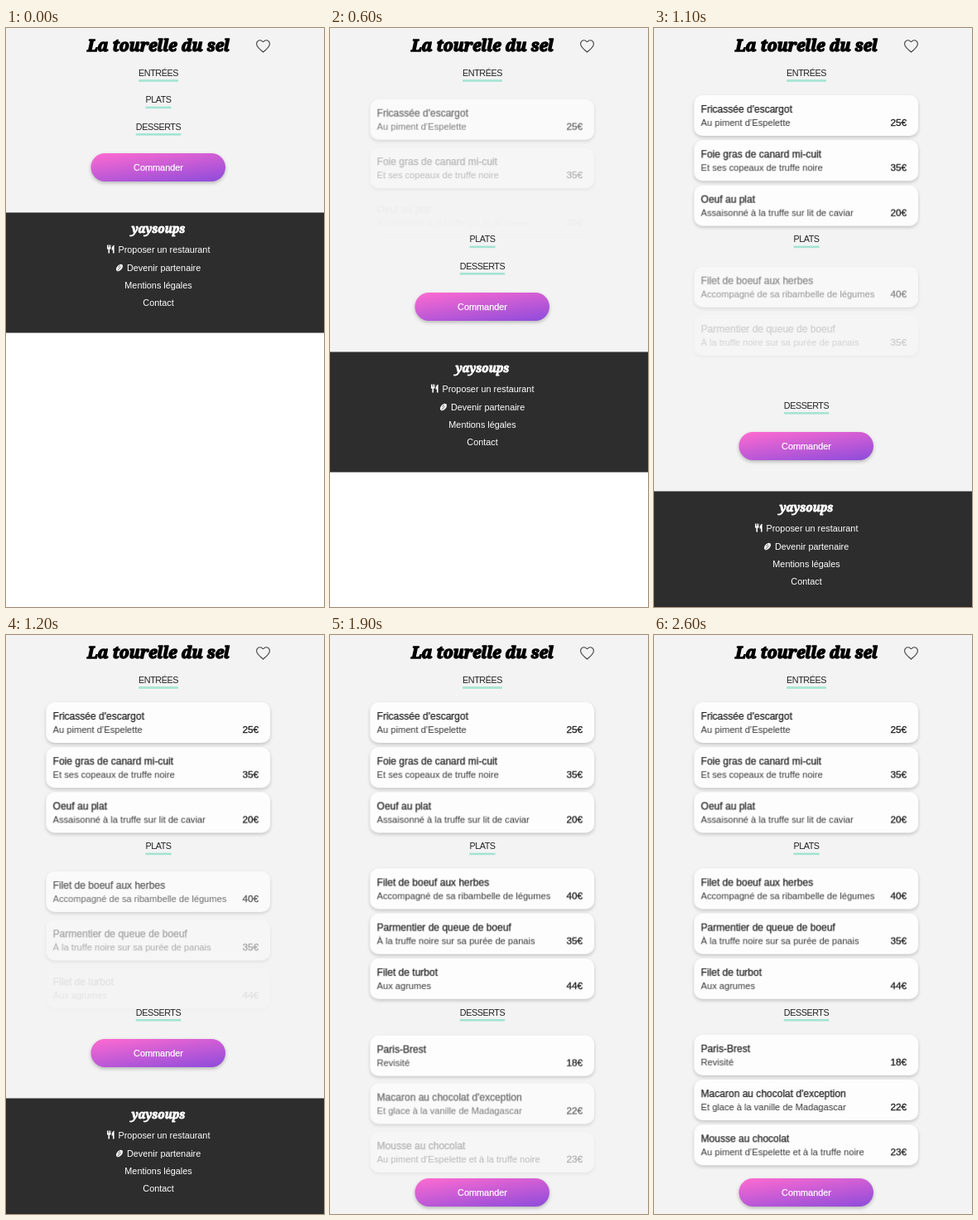
An HTML page with a canvas for the animation above (3.9 s loop, 384 by 698 pixels).

```html
<!DOCTYPE html>
<html lang="fr">
<head>
<meta charset="utf-8">
<title>Menu</title>
<style>
html, body { margin: 0; width: 100%; height: 100%; overflow: hidden; background: #fff; }
canvas { display: block; width: 384px; height: 698px; }
</style>
</head>
<body>
<canvas id="stage"></canvas>
<script>
const W = 384, H = 698, MID = 184;
const LOOP = 3900, STEP = 100;
const ROW = 32.4, OPEN = 168, PITCH = 54.2;
const DELAY = 175, STAGGER = 150, FADE = 540, RISE = 12.5;
const FOOT = 222.5;
const CARD = { x: 48.4, y: 81, w: 270.6, h: 49, pad: 10 };
const SANS = '"Liberation Sans", Arial, sans-serif';
const SLAB = '"Noto Serif", serif';

const sections = [
  { name: 'ENTRÉES', at: 100, dishes: [
    ["Fricassée d'escargot", 'Au piment d’Espelette', '25€'],
    ['Foie gras de canard mi-cuit', 'Et ses copeaux de truffe noire', '35€'],
    ['Oeuf au plat', 'Assaisonné à la truffe sur lit de caviar', '20€'] ] },
  { name: 'PLATS', at: 655, dishes: [
    ['Filet de boeuf aux herbes', 'Accompagné de sa ribambelle de légumes', '40€'],
    ['Parmentier de queue de boeuf', 'À la truffe noire sur sa purée de panais', '35€'],
    ['Filet de turbot', 'Aux agrumes', '44€'] ] },
  { name: 'DESSERTS', at: 1240, dishes: [
    ['Paris-Brest', 'Revisité', '18€'],
    ["Macaron au chocolat d'exception", 'Et glace à la vanille de Madagascar', '22€'],
    ['Mousse au chocolat', 'Au piment d’Espelette et à la truffe noire', '23€'] ] }
];

const dpr = window.devicePixelRatio || 1;

function surface(canvas, w, h) {
  canvas.width = Math.round(w * dpr);
  canvas.height = Math.round(h * dpr);
  const c = canvas.getContext('2d');
  c.scale(canvas.width / w, canvas.height / h);
  return c;
}

const ctx = surface(document.getElementById('stage'), W, H);

function text(c, str, x, y, size, color, opt = {}) {
  c.font = `${opt.style || ''} ${size}px ${opt.family || SANS}`;
  c.textAlign = opt.align || 'left';
  c.letterSpacing = (opt.spacing || 0) + 'px';
  c.fillStyle = c.strokeStyle = color;
  c.fillText(str, x, y);
  if (opt.weight) {
    c.lineWidth = opt.weight;
    c.lineJoin = 'round';
    c.strokeText(str, x, y);
  }
}

function panel(c, x, y, w, h, r, fill, shade) {
  c.save();
  c.shadowColor = `rgba(0,0,0,${shade})`;
  c.shadowBlur = 4 * dpr;
  c.shadowOffsetY = 2 * dpr;
  c.fillStyle = fill;
  c.beginPath();
  c.roundRect(x, y, w, h, r);
  c.fill();
  c.restore();
}

// Each card is drawn once so that it can fade as a whole.
function makeCard([title, note, price]) {
  const img = document.createElement('canvas');
  const { w, h, pad } = CARD;
  const c = surface(img, w + 2 * pad, h + 2 * pad);
  c.translate(pad, pad);
  panel(c, 0, 0, w, h, 10, '#fdfdfd', 0.2);
  text(c, title, 8.3, 21.2, 12, '#222', { weight: 0.25 });
  text(c, note, 8.3, 36.5, 11.1, '#383838');
  text(c, price, 256.6, 36.5, 11.7, '#222', { align: 'right', weight: 0.35 });
  return img;
}
for (const s of sections) s.cards = s.dishes.map(makeCard);

function progress(t) {
  const u = Math.min(1, Math.max(0, t / FADE));
  return (u + u * u * (3 - 2 * u)) / 2;
}

function drawHeader() {
  text(ctx, 'La tourelle du sel', MID, 28, 19.4, '#000',
    { family: SLAB, style: 'italic 700', align: 'center', weight: 1.5 });
  ctx.strokeStyle = '#444';
  ctx.lineWidth = 1.1;
  ctx.beginPath();
  ctx.moveTo(310.5, 17);
  ctx.bezierCurveTo(307.5, 13.2, 302.6, 14.6, 302.6, 19.2);
  ctx.bezierCurveTo(302.6, 22.6, 306, 25, 310.5, 29.2);
  ctx.bezierCurveTo(315, 25, 318.4, 22.6, 318.4, 19.2);
  ctx.bezierCurveTo(318.4, 14.6, 313.5, 13.2, 310.5, 17);
  ctx.stroke();
}

function drawHeading(name, y) {
  text(ctx, name, MID, y + 58, 10.8, '#222', { align: 'center', spacing: -0.45 });
  const w = ctx.measureText(name).width;
  ctx.fillStyle = '#a3e4d2';
  ctx.fillRect(MID - w / 2, y + 62.2, w, 2.6);
}

function drawCards(section, y, t) {
  section.cards.forEach((img, i) => {
    const p = progress(t - section.at - DELAY - i * STAGGER);
    if (!p) return;
    ctx.globalAlpha = p;
    ctx.drawImage(img, CARD.x - CARD.pad,
      y + CARD.y - CARD.pad + i * PITCH + RISE * (1 - p),
      CARD.w + 2 * CARD.pad, CARD.h + 2 * CARD.pad);
  });
  ctx.globalAlpha = 1;
}

// A linear gradient at an angle, from corner to corner as in CSS.
function slant(x, y, w, h, deg, from, to) {
  const a = deg * Math.PI / 180, sin = Math.sin(a), cos = -Math.cos(a);
  const half = (w * Math.abs(sin) + h * Math.abs(cos)) / 2;
  const cx = x + w / 2, cy = y + h / 2;
  const g = ctx.createLinearGradient(cx - sin * half, cy - cos * half,
    cx + sin * half, cy + cos * half);
  g.addColorStop(0, from);
  g.addColorStop(1, to);
  return g;
}

function drawButton(y) {
  const x = 102.5, w = 162.5, h = 34;
  const fill = slant(x, y, w, h, 172, '#ff6bd0', '#8d4bdb');
  panel(ctx, x, y, w, h, 17, fill, 0.25);
  text(ctx, 'Commander', MID, y + 21, 10.9, '#fff', { align: 'center', weight: 0.25 });
}

function drawUtensils(x, y) {
  ctx.fillStyle = '#fff';
  for (let i = 0; i < 3; i++) ctx.fillRect(x + i * 1.7, y, 1.1, 4);
  ctx.fillRect(x, y + 3, 4.5, 2);
  ctx.fillRect(x + 1.5, y + 4, 1.6, 6);
  ctx.beginPath();
  ctx.moveTo(x + 8.6, y);
  ctx.quadraticCurveTo(x + 5.4, y + 1.5, x + 5.6, y + 6);
  ctx.lineTo(x + 7, y + 6);
  ctx.lineTo(x + 7, y + 10);
  ctx.lineTo(x + 8.6, y + 10);
  ctx.fill();
}

function drawPartner(x, y) {
  ctx.save();
  ctx.translate(x, y);
  ctx.rotate(-0.85);
  ctx.fillStyle = '#fff';
  ctx.beginPath();
  ctx.ellipse(0, 0, 5, 3, 0, 0, 7);
  ctx.fill();
  ctx.strokeStyle = '#2d2d2d';
  ctx.lineWidth = 0.7;
  ctx.beginPath();
  ctx.moveTo(-4, 0.6);
  ctx.lineTo(2.2, 0.6);
  ctx.moveTo(-1, -1.2);
  ctx.lineTo(2.8, -1.2);
  ctx.stroke();
  ctx.restore();
}

function drawFooter(y) {
  const mid = { align: 'center' };
  ctx.fillStyle = '#2d2d2d';
  ctx.fillRect(0, y, W, 145);
  text(ctx, 'yaysoups', MID, y + 24, 13.6, '#fff',
    { family: SLAB, style: 'italic 700', align: 'center', weight: 0.9 });
  drawUtensils(122, y + 39);
  text(ctx, 'Proposer un restaurant', 135.5, y + 48.5, 10.85, '#fff');
  drawPartner(137, y + 66.5);
  text(ctx, 'Devenir partenaire', 146, y + 70.2, 10.85, '#fff');
  text(ctx, 'Mentions légales', MID, y + 91.2, 10.85, '#fff', mid);
  text(ctx, 'Contact', MID, y + 112.7, 10.85, '#fff', mid);
}

function draw(t) {
  const shift = OPEN * sections.filter(s => t >= s.at).length;
  ctx.fillStyle = '#fff';
  ctx.fillRect(0, 0, W, H);
  ctx.fillStyle = '#f3f3f3';
  ctx.fillRect(0, 0, W, FOOT + 1 + shift);
  drawHeader();
  let y = 0;
  for (const s of sections) {
    drawCards(s, y, t);
    drawHeading(s.name, y);
    y += ROW + (t >= s.at ? OPEN : 0);
  }
  drawButton(151 + shift);
  drawFooter(FOOT + shift);
}

// The picture advances ten times a second.
const start = performance.now();
function tick() {
  const t = (performance.now() - start) % LOOP;
  draw(Math.floor(t / STEP) * STEP);
  requestAnimationFrame(tick);
}
tick();
</script>
</body>
</html>
```
